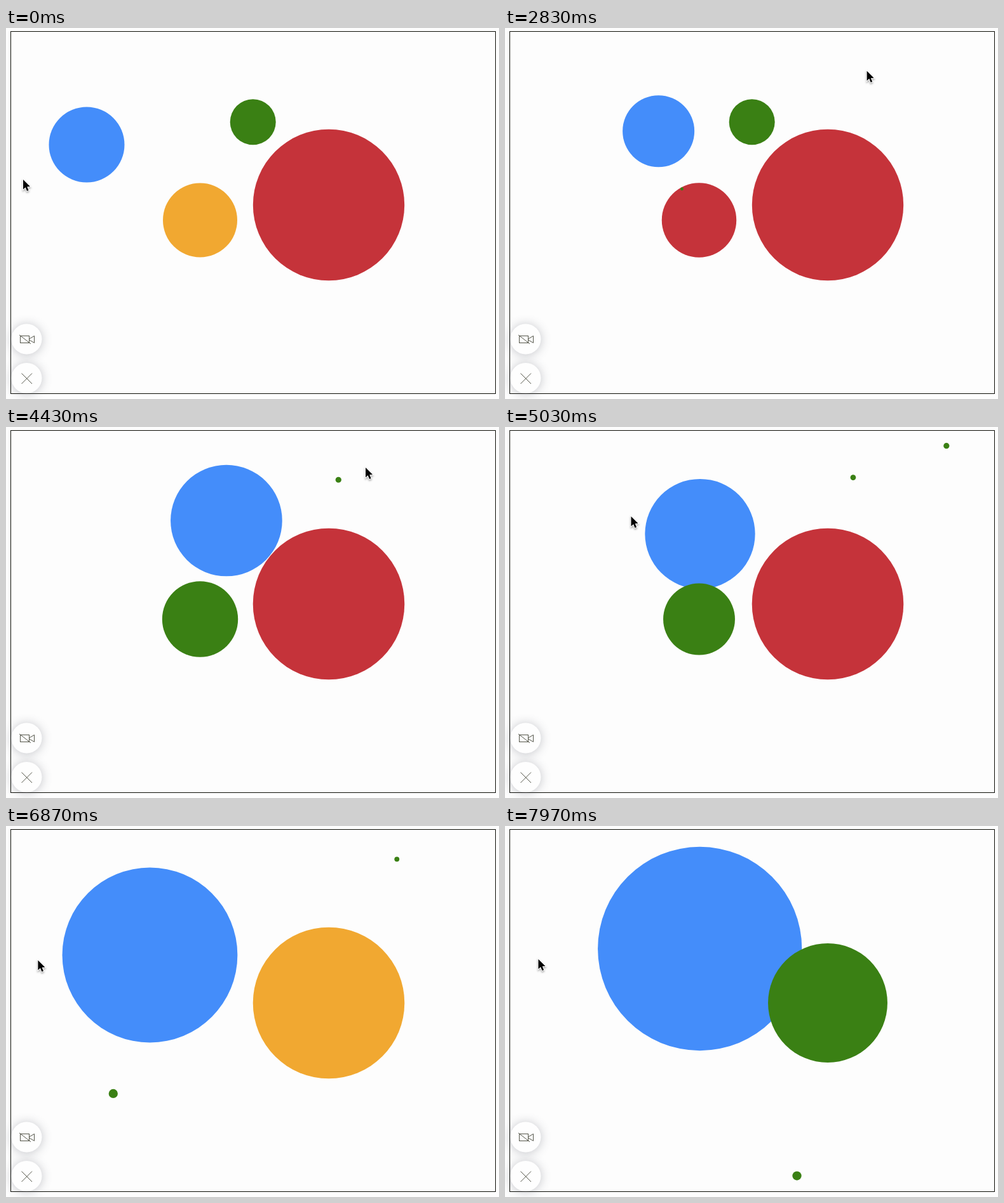
Recreate the animation shown at these times as an HTML page with a canvas. Size 776x585 px, loop 8000 ms.

```html
<!DOCTYPE html>
<html lang="en">
<head>
<meta charset="utf-8">
<title>Bubbles</title>
<style>
html, body { margin: 0; width: 100%; height: 100%; overflow: hidden; background: #fdfdfd; }
canvas { display: block; }
</style>
</head>
<body>
<canvas id="stage" width="776" height="585"></canvas>
<script>
const ctx = document.getElementById('stage').getContext('2d');
const LOOP = 8000, STEP = 10;
const BLUE = '#448dfa', RED = '#c5333a', ORANGE = '#f1a831', GREEN = '#3a8014';
const WALL = { left: 8, top: 5.5, right: 770, bottom: 577 };

const SHOT_SIZE = 0.05;    // share of the player's radius
const SHOT_GAP = 1.25;     // start distance in player radii
const SHOT_SPEED = 0.22;   // px per ms, relative to the player
const DRAIN = 0.0031;      // radius lost per ms and px of overlap
const DOT_YIELD = 0.4;     // share of a dot's radius its eater gains

// The player drifts straight between these points and fires at each inner one.
const route = [[0, 127, 184], [1380, 127, 184], [4180, 348.2, 142.9], [4510, 346.5, 149],
  [6020, 232, 205.7], [6942, 226, 203.3], [7970, 306.7, 193.5]];

const pointer = [[0, 27, 239], [1380, 28, 202], [1850, 28, 198], [2450, 570, 68], [4510, 566, 64],
  [5030, 198.5, 141], [6020, 107, 281], [6070, 107.5, 262], [6500, 50, 212], [7970, 52.5, 210]];

const linear = k => k;
const smooth = k => k * k * (3 - 2 * k);

function along(points, t, ease = linear) {
  const i = points.findIndex(p => p[0] > t);
  if (i < 0) return points[points.length - 1].slice(1);
  const [t0, x0, y0] = points[i - 1], [t1, x1, y1] = points[i];
  const k = ease((t - t0) / (t1 - t0));
  return [x0 + (x1 - x0) * k, y0 + (y1 - y0) * k];
}

// Reflects a straight run back and forth between two walls.
function fold(v, low, high) {
  const span = high - low, turn = 2 * span;
  const m = ((v - low) % turn + turn) % turn;
  return low + Math.min(m, turn - m);
}

function newWorld() {
  const player = { x: 127, y: 184, r: 59.5, player: true };
  const others = [
    { x: 388.7, y: 148.3, r: 36 },
    { x: 305.5, y: 303, r: 58.5 },
    { x: 508, y: 279, r: 119.2 }
  ];
  return { t: 0, player, bodies: [player, ...others] };
}

function shoot(world, i) {
  const { player, bodies } = world;
  const [t0, xa, ya] = route[i - 1], [born, x, y] = route[i];
  const [aimX, aimY] = along(pointer, born, smooth);
  const reach = Math.hypot(aimX - x, aimY - y);
  const dx = (aimX - x) / reach, dy = (aimY - y) / reach;
  const size = player.r * SHOT_SIZE;
  player.r -= size;
  const gap = player.r * SHOT_GAP;
  bodies.push({
    dot: true, born, r: size, size,
    x0: x + dx * gap, y0: y + dy * gap,
    vx: (x - xa) / (born - t0) + dx * SHOT_SPEED,
    vy: (y - ya) / (born - t0) + dy * SHOT_SPEED
  });
}

function place(body, t) {
  if (body.player) [body.x, body.y] = along(route, t);
  if (body.dot) {
    const age = t - body.born, s = body.size;
    body.x = fold(body.x0 + body.vx * age, WALL.left + s, WALL.right - s);
    body.y = fold(body.y0 + body.vy * age, WALL.top + s, WALL.bottom - s);
  }
}

// Of two overlapping bodies the larger drains the smaller.
function drain(a, b) {
  const overlap = a.r + b.r - Math.hypot(a.x - b.x, a.y - b.y);
  if (overlap <= 0) return;
  const [big, small] = a.r > b.r ? [a, b] : [b, a];
  const loss = Math.min(small.r, overlap * DRAIN * STEP);
  small.r -= loss;
  big.r += loss * (small.dot ? DOT_YIELD : 1);
}

function advance(world) {
  const { bodies } = world;
  const next = world.t + STEP;
  for (let i = 1; i < route.length - 1; i++) {
    if (route[i][0] > world.t && route[i][0] <= next) shoot(world, i);
  }
  world.t = next;
  bodies.forEach(body => place(body, next));
  bodies.forEach((a, i) => bodies.slice(i + 1).forEach(b => drain(a, b)));
  world.bodies = bodies.filter(body => body.r > 0);
}

function disc(x, y, r, color) {
  ctx.fillStyle = color;
  ctx.beginPath();
  ctx.arc(x, y, r, 0, Math.PI * 2);
  ctx.fill();
}

function trace(points, close) {
  ctx.beginPath();
  points.forEach(([x, y]) => ctx.lineTo(x, y));
  if (close) ctx.closePath();
}

function stroke(...points) {
  trace(points);
  ctx.stroke();
}

function tint(body, player) {
  if (body === player) return BLUE;
  if (body.r > player.r) return RED;
  return body.r > player.r * 0.75 ? ORANGE : GREEN;
}

function button(x, y) {
  ctx.save();
  ctx.shadowColor = 'rgba(70,75,90,.32)';
  ctx.shadowBlur = 16;
  ctx.shadowOffsetY = 1;
  disc(x, y, 24, '#fefefe');
  ctx.restore();
}

function controls() {
  button(32.5, 490.5);
  button(32.5, 552);
  ctx.strokeStyle = '#55564a';
  ctx.lineWidth = 1;
  ctx.strokeRect(22.5, 485.5, 14, 11);
  stroke([37, 490], [44.5, 485.5], [44.5, 496.5], [37, 492]);
  stroke([21, 484], [39, 498]);
  stroke([24.5, 544.5], [41, 561]);
  stroke([41, 544.5], [24.5, 561]);
}

function cursor(x, y) {
  ctx.save();
  ctx.translate(x, y);
  trace([[0, 0], [0, 15.5], [3.6, 12.2], [6, 18], [8.6, 17], [6.2, 11.3], [11, 11]], true);
  ctx.shadowColor = 'rgba(0,0,0,.35)';
  ctx.shadowBlur = 3;
  ctx.shadowOffsetY = 2;
  ctx.strokeStyle = '#fff';
  ctx.lineWidth = 2;
  ctx.stroke();
  ctx.shadowColor = 'transparent';
  ctx.fillStyle = '#000';
  ctx.fill();
  ctx.restore();
}

let world = newWorld();

function draw(t) {
  if (t < world.t - STEP) world = newWorld();
  while (world.t < t) advance(world);

  ctx.fillStyle = '#fdfdfd';
  ctx.fillRect(0, 0, 776, 585);
  for (const body of world.bodies) {
    place(body, t);
    disc(body.x, body.y, body.r, tint(body, world.player));
  }
  ctx.strokeStyle = '#0c0d06';
  ctx.lineWidth = 1;
  ctx.strokeRect(7.5, 5.5, 763, 571);
  controls();
  cursor(...along(pointer, t, smooth));
}

const start = performance.now();
function tick() {
  draw((performance.now() - start) % LOOP);
  requestAnimationFrame(tick);
}
tick();
</script>
</body>
</html>
```
